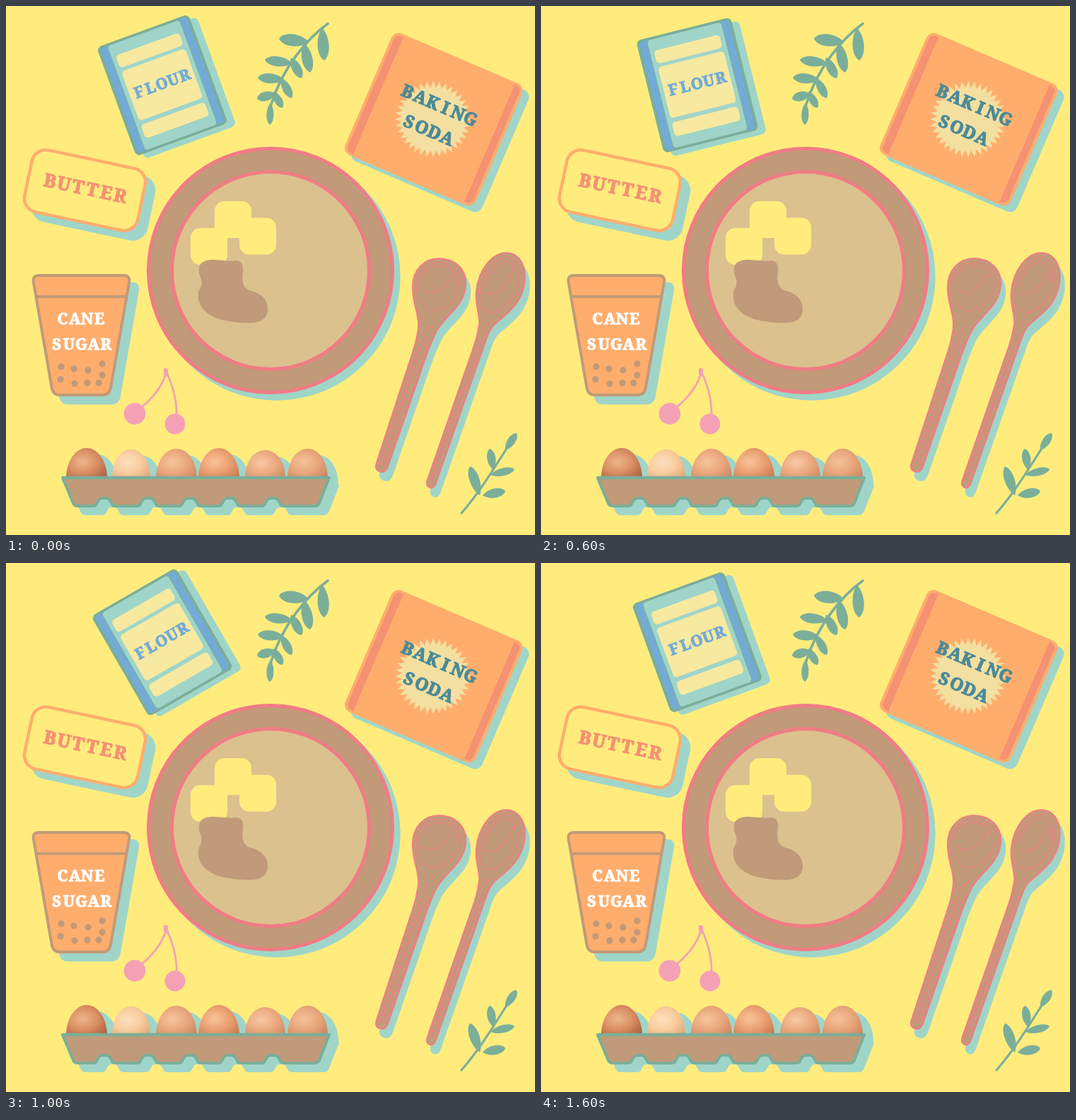
Recreate the animation shown at these times as an HTML page. Size 748 by 748 pixels, loop 1.7 s.

```html
<!DOCTYPE html>
<html lang="en">
<head>
<meta charset="utf-8">
<title>Baking table</title>
<style>
html, body { margin: 0; width: 100%; height: 100%; overflow: hidden; background: #ffec7d; }
svg { display: block; width: 100vw; height: 100vh; }
text { font-family: "Noto Serif", "Liberation Serif", serif; font-weight: 700; text-anchor: middle; stroke-width: .05em; stroke-linejoin: round; }
</style>
</head>
<body>
<svg id="stage" viewBox="0 0 748 748"></svg>
<script>
const SHADE = '#9fd5c9', GREEN = '#7bae99', BLUE = '#73abd7', CREAM = '#f7e99f',
  ORANGE = '#ffad6c', CORAL = '#f59173', BROWN = '#c19a79', PINK = '#f07c84',
  ROSE = '#f4a1b5', YELLOW = '#ffec7d', SAND = '#dbc18e', INK = '#4b8a98';

const group = (transform, ...parts) => `<g transform="${transform}">${parts.join('')}</g>`;
const shift = (x, y, ...parts) => group(`translate(${x} ${y})`, ...parts);
const path = (d, fill, extra = '') => `<path d="${d}" fill="${fill}" ${extra}/>`;
const line = (d, color, w) => path(d, 'none', `stroke="${color}" stroke-width="${w}" stroke-linecap="round" stroke-linejoin="round"`);
const disc = (x, y, r, fill, extra = '') => `<circle cx="${x}" cy="${y}" r="${r}" fill="${fill}" ${extra}/>`;
const edge = (color, w) => `stroke="${color}" stroke-width="${w}" stroke-linejoin="round"`;
const box = (x0, y0, x1, y1, r, fill, extra = '') =>
  `<rect x="${x0}" y="${y0}" width="${x1 - x0}" height="${y1 - y0}" rx="${r}" fill="${fill}" ${extra}/>`;

// Evenly pitched lettering centred on (x, y)
function label(str, x, y, pitch, fill, angle = 0) {
  const xs = [...str].map((_, i) => ((i - (str.length - 1) / 2) * pitch).toFixed(1));
  const size = pitch * 1.27;
  return group(`translate(${x} ${y}) rotate(${angle})`,
    `<text x="${xs.join(' ')}" y="${(size * 0.357).toFixed(1)}" font-size="${size.toFixed(1)}" fill="${fill}" stroke="${fill}">${str}</text>`);
}

// Pointed oval between two points
function leaf([x0, y0, x1, y1, w]) {
  const len = Math.hypot(x1 - x0, y1 - y0);
  const nx = -(y1 - y0) / len * w * 0.67, ny = (x1 - x0) / len * w * 0.67;
  const at = (t, s) => `${(x0 + (x1 - x0) * t + nx * s).toFixed(1)} ${(y0 + (y1 - y0) * t + ny * s).toFixed(1)}`;
  return path(`M${x0} ${y0}C${at(.28, 1)} ${at(.85, 1)} ${x1} ${y1}C${at(.85, -1)} ${at(.28, -1)} ${x0} ${y0}Z`, GREEN);
}

function branches() {
  const top = [
    [428, 51, 386, 46, 17], [447, 31, 450, 77, 16], [421, 52, 430, 94, 15],
    [405, 81, 366, 76, 14], [403, 73, 418, 102, 13], [393, 104, 356, 101, 14],
    [389, 102, 404, 130, 12], [381, 124, 355, 131, 13], [378, 121, 391, 144, 11],
    [374, 137, 373, 168, 10]];
  const low = [
    [706, 628, 722, 604, 11], [689, 656, 684, 626, 12], [685, 663, 719, 655, 11],
    [670, 692, 656, 651, 14], [674, 692, 706, 686, 13]];
  return line('M455 25C426 46 390 88 374 142', GREEN, 3.6) + top.map(leaf).join('') +
    line('M644 717C668 690 690 654 714 616', GREEN, 3.2) + low.map(leaf).join('');
}

function flour() {
  const size = [-69, -82, 69, 82, 7];
  return shift(10, 7.5, box(...size, SHADE)) +
    box(...size, GREEN) +
    box(-65, -79, 65, 79, 5, BLUE) +
    box(-54.5, -79, 54.5, 79, 5, SHADE, edge(GREEN, 1.2)) +
    box(-48, -62, 47.5, -43, 5, CREAM) +
    box(-48, -38, 48, 36.5, 5, CREAM) +
    box(-48, 42.5, 48, 63, 5, CREAM) +
    label('FLOUR', 0, -2.5, 17.2, BLUE);
}

function soda() {
  const size = [-100.5, -93.5, 100.5, 93.5, 11], pose = 'translate(604.7 160.2) rotate(23.2)';
  const burst = Array.from({ length: 72 }, (_, i) => {
    const r = i % 2 ? 44.5 : 54, a = i * Math.PI / 36 + 1.57;
    return (604 + r * Math.cos(a)).toFixed(1) + ' ' + (160 + r * Math.sin(a)).toFixed(1);
  });
  return shift(9, 9, group(pose, box(...size, SHADE))) +
    group(pose, box(...size, ORANGE), box(-96.5, -90, 96.5, 90, 8, CORAL), box(-85, -93, 86, 93, 7, ORANGE)) +
    path(`M${burst.join('L')}Z`, '#f3dfa0') +
    label('BAKING', 612.5, 140, 19.3, INK, 23.2) + label('SODA', 597, 175, 19.3, INK, 23.2);
}

function butter() {
  const pose = 'translate(111.5 260.5) rotate(12)';
  return shift(12, 12, group(pose, box(-84, -47, 84, 47, 22, SHADE))) +
    group(pose, box(-81.8, -44.8, 81.8, 44.8, 20, YELLOW, edge(ORANGE, 4.4))) +
    label('BUTTER', 112, 257.5, 20.3, CORAL, 12);
}

function cup() {
  const d = 'M47 381H166Q176 381 174 391L148 540Q146 550 136 550H76Q67 550 65 541L39 391Q37 381 47 381Z';
  const dots = [[78, 510], [96, 513], [116, 515], [136, 506], [77, 528], [97, 534], [115, 533], [131, 533], [136, 522]];
  return shift(12, 11.5, path(d, SHADE, edge(SHADE, 4))) +
    path(d, ORANGE, edge(BROWN, 4)) + line('M43 411H170', BROWN, 4) +
    dots.map(([x, y]) => disc(x, y, 4.7, BROWN)).join('') +
    label('CANE', 106, 442.5, 17.4, '#fff') + label('SUGAR', 106.5, 478, 17.4, '#fff');
}

function bowl() {
  const blob = 'M273 374C272 362 283 358 297 359C311 360 318 361 325 360C334 360 336 367 335 376C333 389 335 400 347 403' +
    'C363 407 371 418 370 430C369 445 356 449 338 448C310 447 286 441 276 425C270 414 271 404 275 398C278 391 276 386 274 381Q272 377 273 374Z';
  return disc(382.7, 382.7, 175, SHADE) +
    disc(374, 374, 172.5, BROWN, edge(PINK, 5)) +
    disc(374, 374, 139.5, SAND, edge(PINK, 5)) +
    [[295, 276], [330, 299.5], [261, 314]].map(([x, y]) => box(x, y, x + 52, y + 52, 14, YELLOW)).join('') +
    path(blob, BROWN);
}

function spoons() {
  const wide = 'M582 462C587 440 575 424 575 398C575 373 591 357 612 357C636 357 651 373 650 394C649 424 621 437 609 459' +
    'C602 473 599 481 594 495L540 651Q536 661 528 658Q521 655 524 646L575 490Q580 476 582 462Z';
  const slim = 'M668 456C673 441 663 426 665 404C668 373 687 349 708 349C728 350 736 370 733 392C728 424 705 437 690 451' +
    'C683 458 680 468 676 480L608 674Q605 683 599 681Q593 678 596 670L659 489Q666 470 668 456Z';
  const body = d => shift(6, 12, path(d, SHADE, edge(SHADE, 2.4))) + path(d, BROWN, edge(PINK, 2.2));
  const grain = d => line(d, PINK, 1.2);
  return body(wide) + body(slim) +
    grain('M580 398C579 376 594 363 611 362C632 362 644 375 643 392C640 414 622 430 604 431C590 430 581 415 580 398Z') +
    grain('M584 391C587 374 600 367 613 367C630 368 639 380 637 392M587 400C599 411 618 406 631 379') +
    grain('M588 465C594 456 600 452 606 453M593 466L582 500L532 648M599 470L587 508L535 652M586 476L528 650') +
    grain('M670 406C672 380 690 356 707 355C723 356 729 374 726 391C721 413 703 430 687 434C674 433 669 420 670 406Z') +
    grain('M676 398C680 377 694 363 706 361C718 362 723 377 720 390M678 405C690 413 709 400 717 372') +
    grain('M673 459C677 451 683 446 688 447M677 459L663 500L603 670M672 472L600 670');
}

function cherries() {
  return line('M226 520C220 541 202 560 188 570M228 520C238 542 242 562 241 582', ROSE, 2.8) +
    path('M223 513Q226 510 229 514L229 523Q226 526 223 520Z', ROSE) +
    disc(182, 576.5, 15.3, ROSE) + disc(239, 591, 14.5, ROSE);
}

function tray() {
  const arches = [139, 201, 260, 316, 377];
  const arch = x => `H${x - 16}Q${x - 12} 707 ${x - 11} 704L${x - 8} 699Q${x - 6} 696 ${x - 3} 696` +
    `H${x + 3}Q${x + 6} 696 ${x + 8} 699L${x + 11} 704Q${x + 12} 707 ${x + 16} 707`;
  return `M80 667L95 703Q97 707 101 707${arches.map(arch).join('')}H437Q441 707 443 703L457 667Z`;
}

function eggs() {
  const rows = [
    [114, 29, 625, '#efb68d', '#d98d62', '#a85f3e'], [177, 27, 627, '#fde0bd', '#f8cc9d', '#dfa578'],
    [241, 29, 626, '#f6c49c', '#eaa77d', '#cb8560'], [301, 29, 625, '#f9c49a', '#ea9f70', '#c87850'],
    [366.5, 28.5, 628, '#f8c9a5', '#ecaa80', '#cf8a63'], [426.5, 28.5, 626, '#f5c29a', '#e9a67b', '#c98461']];
  const shape = ([x, r, y]) => `M${x - r} 668C${x - r} 644 ${x - 16} ${y} ${x} ${y}C${x + 16} ${y} ${x + r} 644 ${x + r} 668Z`;
  const tint = ([, , , a, b, c], i) => `<radialGradient id="egg${i}" cx=".4" cy=".45" r=".75">` +
    `<stop offset="0" stop-color="${a}"/><stop offset=".5" stop-color="${b}"/><stop offset="1" stop-color="${c}"/></radialGradient>`;
  const carton = tray();
  return `<defs>${rows.map(tint).join('')}</defs>` +
    shift(15, 9, rows.map(e => path(shape(e), SHADE)).join('')) +
    shift(12, 11, path(carton, SHADE, edge(SHADE, 4))) +
    rows.map((e, i) => path(shape(e), `url(#egg${i})`)).join('') +
    path(carton, BROWN, edge(GREEN, 4)) + line('M81 667H456', GREEN, 4.5);
}

const stage = document.getElementById('stage');
stage.innerHTML = branches() + `<g id="flour">${flour()}</g>` + soda() + butter() + cup() +
  bowl() + spoons() + cherries() + eggs();

// Sway of the flour packet: time in ms, offset in degrees
const LOOP = 1700, STEP = 100, REST = -20;
const sway = [[0, 0], [500, 10], [1000, -10], [1200, -7.3], [1600, 0], [1700, 0]];
const packet = document.getElementById('flour');

function angleAt(t) {
  const i = sway.findIndex(([end]) => t < end);
  const [t0, a0] = sway[i - 1], [t1, a1] = sway[i];
  return REST + a0 + (a1 - a0) * (t - t0) / (t1 - t0);
}

function draw(now) {
  const t = Math.floor(now % LOOP / STEP) * STEP;
  packet.setAttribute('transform', `translate(221 112) rotate(${angleAt(t).toFixed(2)})`);
}

const start = performance.now();
function tick() {
  draw(performance.now() - start);
  requestAnimationFrame(tick);
}
tick();
</script>
</body>
</html>
```
